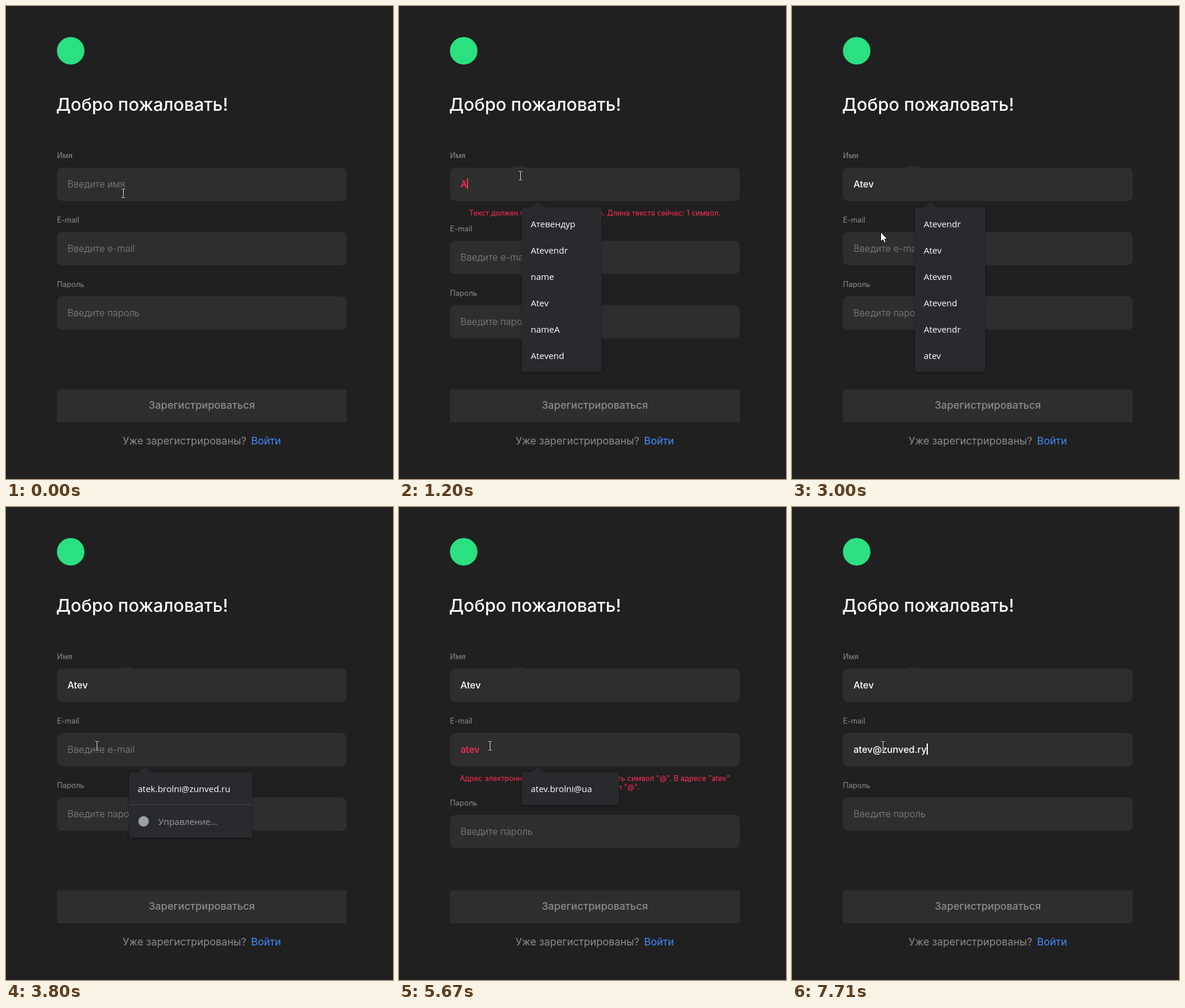
An HTML page that plays this animation: 661 by 808 pixels, repeating every 8 s.

```html
<!DOCTYPE html>
<html lang="ru">
<head>
<meta charset="utf-8">
<title>Регистрация</title>
<style>
  html, body { margin: 0; width: 661px; height: 808px; overflow: hidden; background: #202020; }
  body { position: relative; font: 16px Inter, sans-serif; font-optical-sizing: none; color: #fff; }
  body > *, .group > * { position: absolute; white-space: pre; }
  .logo { left: 87px; top: 52.5px; width: 47px; height: 47px; border-radius: 50%; background: #2be080; }
  h1 { left: 85.5px; top: 148px; margin: 0; font-size: 30px; font-weight: 500; line-height: 40px; }
  .group { left: 87px; width: 495px; }
  .label { top: -30px; font-size: 12.8px; line-height: 20px; color: #8c8c8c; }
  .field { width: 477px; height: 55px; padding: 0 0 2px 18px; border-radius: 9px; background: #2e2e2e;
           display: flex; align-items: center; }
  .hint { position: absolute; left: 18px; font-weight: 300; color: #858585; }
  .value { font-weight: 450; }
  .caret { width: 2px; height: 19px; background: currentColor; }
  .error { top: 70px; width: 100%; text-align: center; font-size: 12.5px; line-height: 15px; color: #ff2e55; }
  .invalid .field { color: #ff2e55; }
  .bump { left: 195px; top: 273.5px; width: 22px; height: 4px; border-radius: 11px 11px 0 0; background: #2c2c2c; }
  .button { left: 87px; top: 655px; width: 495px; height: 56px; line-height: 53px; border-radius: 2px;
            background: #2e2e2e; color: #8c8c8c; font-size: 17.6px; font-weight: 500; text-align: center; }
  .signin { left: 87px; top: 731px; width: 495px; line-height: 24px; font-size: 17.6px; color: #8c8c8c; text-align: center; }
  .signin b { margin-left: 3px; font-weight: 400; color: #3f8cff; }
  .popup { left: 210px; padding: 6px 0 5px; border-radius: 4px; background: #292a2d;
           box-shadow: 0 1px 4px rgba(0, 0, 0, .4); font: 15px 'Open Sans', sans-serif; }
  .popup::before { content: ''; position: absolute; left: 17px; top: -9px;
                   border: solid transparent; border-width: 0 10px 9px; border-bottom-color: #292a2d; }
  .popup div { padding-left: 15px; line-height: 45px; }
  .popup .manage { position: relative; margin: 4px 0 -5px; padding-left: 50px; line-height: 56px;
                   border-top: 1px solid #3f4145; color: #9aa0a6; }
  .manage::before { content: ''; position: absolute; left: 16px; top: 19px; width: 18px; height: 18px;
                    border-radius: 50%; background: #9aa0a6; }
  svg { overflow: visible; left: 0; top: 0; width: 1px; height: 1px; }
</style>
</head>
<body>
<i class="logo"></i>
<h1>Добро пожаловать!</h1>
<i class="bump"></i>
<div class="button">Зарегистрироваться</div>
<div class="signin">Уже зарегистрированы? <b>Войти</b></div>
<svg>
  <path id="beam" fill="none" stroke="#111" stroke-width="2.4" d="M-3-7.5h2.3l.7.7.7-.7H3M-3 7.5h2.3l.7-.7.7.7H3M0-7V7"/>
  <path id="beamCore" fill="none" stroke="#fff" d="M-3-7.5h2.3l.7.7.7-.7H3M-3 7.5h2.3l.7-.7.7.7H3M0-7V7"/>
  <path id="arrow" fill="#fff" stroke="#000" d="M0 0V16.5L3.8 13 6.3 18.6 9 17.5 6.6 12H11.5Z"/>
</svg>
<script>
const LOOP = 8000, BLINK = 530;
const NAME_FOCUS = 340, MAIL_FOCUS = 3270;

const nameKeys = [[1200, 'A'], [1400, 'At'], [1860, 'Ate'], [2070, 'Atev']];
const mailKeys = [
  [4600, 'a'], [4680, 'at'], [4880, 'ate'], [5140, 'atev'], [5740, 'atev@'], [6150, 'atev@z'],
  [6350, 'atev@zu'], [6490, 'atev@zun'], [6630, 'atev@zunve'], [6830, 'atev@zunved'],
  [7230, 'atev@zunved.'], [7380, 'atev@zunved.r'], [7710, 'atev@zunved.ry']
];
const eventTimes = [NAME_FOCUS, MAIL_FOCUS, ...nameKeys.map(k => k[0]), ...mailKeys.map(k => k[0])]
  .sort((a, b) => a - b);
const mousePath = [
  [60, 200, 320], [200, 207, 290], [2600, 207, 290], [3000, 151, 386],
  [3270, 142, 408], [3470, 142, 408], [3540, 155, 408]
];

function add(className, html, parent = document.body) {
  const el = document.createElement('div');
  el.className = className;
  el.innerHTML = html;
  return parent.appendChild(el);
}

const groups = [['Имя', 'имя'], ['E-mail', 'e-mail'], ['Пароль', 'пароль']].map(([label, hintText]) => {
  const root = add('group', '');
  add('label', label, root);
  const field = add('field',
    `<span class="hint">Введите ${hintText}</span><span class="value"></span><i class="caret"></i>`, root);
  const [hint, value, caret] = field.children;
  return { root, hint, value, caret, error: add('error', '', root) };
});

function popup(top, width, start, end, fade, items, manage) {
  const rows = items.map(item => `<div>${item}</div>`).join('');
  const el = add('popup', rows + (manage ? '<div class="manage">Управление…</div>' : ''));
  el.style.top = top + 'px';
  el.style.width = width + 'px';
  return { el, start, end, fade };
}
const popups = [
  popup(344, 136, 350, 1400, 1, ['Атевендур', 'Atevendr', 'name', 'Atev', 'nameA', 'Atevend']),
  popup(344, 120, 1400, 3340, 200, ['Atevendr', 'Atev', 'Ateven', 'Atevend', 'Atevendr', 'atev']),
  popup(453, 211, 3400, 5140, 1, ['atek.brolni@zunved.ru'], true),
  popup(453, 166, 5140, 5740, 200, ['atev.brolni@ua'])
];
document.body.append(document.querySelector('svg'));

function nameError(text) {
  return text.length === 1
    ? 'Текст должен быть не короче 2 симв. Длина текста сейчас: 1 символ.' : '';
}

function mailError(text) {
  if (!text) return '';
  if (!text.includes('@'))
    return `Адрес электронной почты должен содержать символ "@". В адресе "${text}"\nотсутствует символ "@".`;
  if (text.endsWith('@')) return `Введите часть адреса после символа "@". Адрес "${text}" неполный.`;
  if (text.endsWith('.')) return `Недопустимое положение символа "." в адресе "${text.split('@')[1]}".`;
  return '';
}

const latest = (keys, t) => keys.reduce((text, [time, next]) => t >= time ? next : text, '');

function mouseAt(t) {
  const i = mousePath.findIndex(p => p[0] > t);
  if (i === 0) return mousePath[0].slice(1);
  if (i < 0) return mousePath.at(-1).slice(1);
  const [t0, x0, y0] = mousePath[i - 1], [t1, x1, y1] = mousePath[i];
  const k = (t - t0) / (t1 - t0);
  return [x0 + (x1 - x0) * k, y0 + (y1 - y0) * k];
}

function drawMouse(t) {
  const [x, y] = mouseAt(t);
  const overField = y > 276 && y < 333 || y > 387 && y < 443;
  for (const id of ['beam', 'beamCore', 'arrow']) {
    const el = document.getElementById(id);
    el.setAttribute('transform', `translate(${Math.round(x) + .5} ${Math.round(y)})`);
    el.style.display = (id !== 'arrow') === overField ? '' : 'none';
  }
}

function render(t) {
  const texts = [latest(nameKeys, t), latest(mailKeys, t), ''];
  const errors = [nameError(texts[0]), mailError(texts[1]), ''];
  const focus = t < NAME_FOCUS ? -1 : t < MAIL_FOCUS ? 0 : 1;
  const lastEvent = eventTimes.filter(time => time <= t).pop() ?? 0;
  const caretOn = Math.floor((t - lastEvent) / BLINK) % 2 === 0;

  let shift = 0;
  groups.forEach((g, i) => {
    g.root.style.top = 276 + 110 * i + shift + 'px';
    g.root.classList.toggle('invalid', errors[i] !== '');
    g.hint.style.display = texts[i] ? 'none' : '';
    g.value.textContent = texts[i];
    g.caret.style.display = focus === i && caretOn ? '' : 'none';
    g.error.textContent = errors[i];
    if (errors[i]) shift += 15 * errors[i].split('\n').length;
  });
  for (const { el, start, end, fade } of popups)
    el.style.opacity = t < start ? 0 : Math.max(0, Math.min(1, 1 - (t - end) / fade));
  document.querySelector('.bump').style.display = t < NAME_FOCUS ? 'none' : '';
  drawMouse(t);
}

const startTime = performance.now();
function tick() {
  render((performance.now() - startTime) % LOOP);
  requestAnimationFrame(tick);
}
tick();
</script>
</body>
</html>
```
